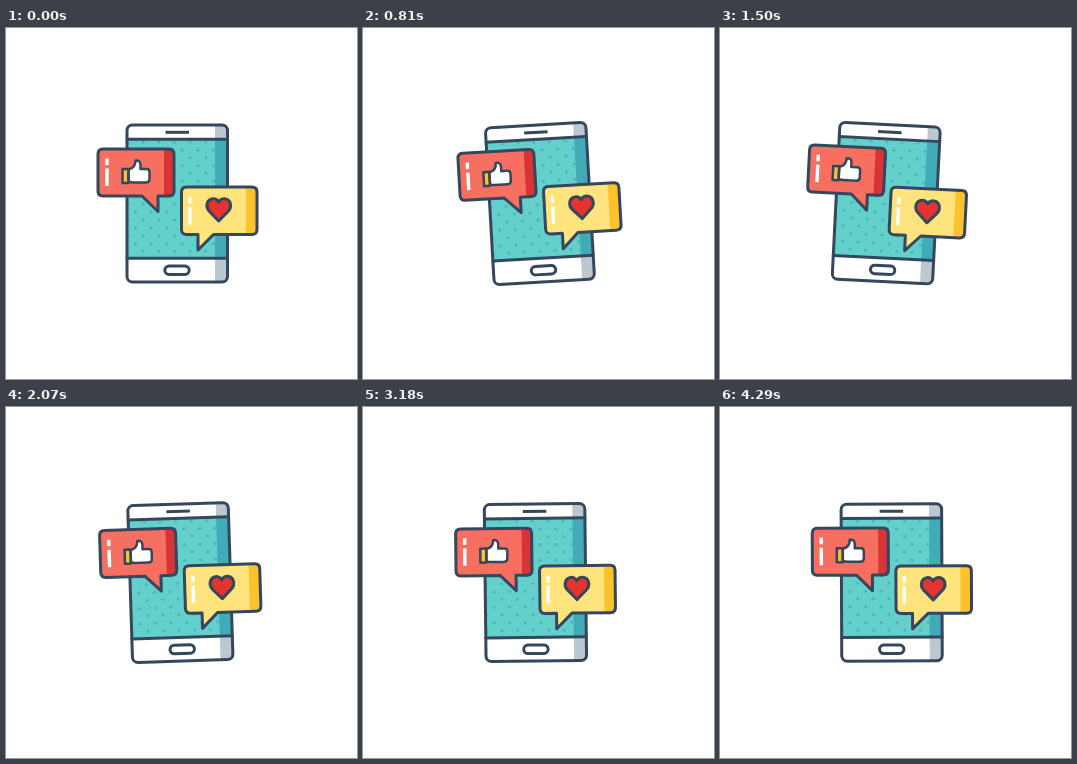
Recreate the animation shown at these times as an HTML page. Size 351 by 351 pixels, loop 4.32 s.

```html
<!DOCTYPE html>
<html lang="en">
<head>
<meta charset="utf-8">
<title>Swinging phone</title>
<style>
  html, body { margin: 0; width: 100%; height: 100%; overflow: hidden; background: #fff; }
  svg { display: block; width: 100vw; height: 100vh; }
  .line { fill: none; stroke: #34475c; stroke-width: 3; stroke-linejoin: round; stroke-linecap: round; }
  .shine { fill: none; stroke: #fff; stroke-width: 3.4; }
</style>
</head>
<body>
<svg viewBox="0 0 351 351">
  <defs>
    <pattern id="dots" x="129.5" y="114" width="15.6" height="15.6" patternUnits="userSpaceOnUse">
      <circle cx="0" cy="8" r="1.5" fill="#47b3b7"/>
      <circle cx="15.6" cy="8" r="1.5" fill="#47b3b7"/>
      <circle cx="7.8" cy="0" r="1.5" fill="#47b3b7"/>
      <circle cx="7.8" cy="15.6" r="1.5" fill="#47b3b7"/>
    </pattern>
    <rect id="body" x="121" y="97" width="100.5" height="157" rx="5.5"/>
    <path id="likeBubble" d="M97 121H163Q168 121 168 126V163Q168 168 163 168H152V183.5L136 168H97Q92 168 92 163V126Q92 121 97 121Z"/>
    <path id="loveBubble" d="M180.500 159H246Q251 159 251 164V201.500Q251 206.500 246 206.500H207.500L192 222V206.500H180.500Q175.500 206.500 175.500 201.500V164Q175.500 159 180.500 159Z"/>
    <clipPath id="bodyClip"><use href="#body"/></clipPath>
    <clipPath id="likeClip"><use href="#likeBubble"/></clipPath>
    <clipPath id="loveClip"><use href="#loveBubble"/></clipPath>
  </defs>

  <g id="phone">
    <g clip-path="url(#bodyClip)">
      <rect x="120" y="96" width="103" height="160" fill="#fff"/>
      <rect x="209" y="96" width="14" height="160" fill="#bcc8d0"/>
      <rect x="120" y="111" width="103" height="119.500" fill="#64d0cc"/>
      <rect x="122" y="113" width="87" height="116" fill="url(#dots)"/>
      <rect x="209" y="111" width="14" height="119.500" fill="#43abb8"/>
    </g>
    <use href="#body" class="line"/>
    <path class="line" d="M121 111.300H221.500M121 230.300H221.500"/>
    <path class="line" style="stroke-linecap:butt" d="M159.500 104.300H183"/>
    <rect class="line" style="fill:#fff" x="158.800" y="238" width="24.400" height="8.500" rx="4.250"/>

    <g clip-path="url(#likeClip)">
      <rect x="90" y="119" width="80" height="67" fill="#f76f60"/>
      <rect x="158" y="119" width="12" height="50" fill="#d63436"/>
    </g>
    <use href="#likeBubble" class="line"/>
    <path class="shine" d="M101 130.500V137M101 140.500V158"/>
    <rect x="116.500" y="141" width="6" height="14" fill="#fcc22d"/>
    <path class="line" style="fill:#fff;stroke-width:2.500" d="M122.500 141.500Q129.500 140 129.500 132.500Q134.500 132 134.500 137V141H140.500Q143.500 141 143.500 144V151Q143.500 154.500 140 154.500H127Q125 154.500 122.500 153.500Z"/>
    <path class="line" style="stroke-width:2.500" d="M122.500 141H116.500V155H122.500Z"/>

    <g clip-path="url(#loveClip)">
      <rect x="174" y="157" width="79" height="67" fill="#ffe37c"/>
      <rect x="240" y="157" width="13" height="51" fill="#fcc22d"/>
    </g>
    <use href="#loveBubble" class="line"/>
    <path class="shine" d="M183.800 169V175.500M183.800 179V196.500"/>
    <path class="line" style="fill:#e5332f" d="M212.700 193L203 183C199.500 179 200.500 172.500 205.500 171C208.500 170 211.500 171.500 212.700 174C214 171.500 217 170 220 171C225 172.500 226 179 222.500 183Z"/>
  </g>
</svg>
<script>
  const LOOP = 4320, SWING = 540;
  const FIRST_ANGLE = 8, DECAY = 0.61;
  const PIVOT = '174.5 76';
  const phone = document.getElementById('phone');

  // Each swing ends on the opposite side, with less reach than the one before.
  const reach = n => n === 0 ? 0 : FIRST_ANGLE * (-DECAY) ** (n - 1);
  const easeOut = p => 1 - (1 - p) ** 3;

  function draw(now) {
    const t = now % LOOP;
    const n = Math.floor(t / SWING);
    const from = reach(n), to = reach(n + 1);
    const angle = from + (to - from) * easeOut(t / SWING - n);
    phone.setAttribute('transform', `rotate(${angle} ${PIVOT})`);
  }

  let start;
  function tick(now) {
    start ??= now;
    draw(now - start);
    requestAnimationFrame(tick);
  }
  draw(0);
  requestAnimationFrame(tick);
</script>
</body>
</html>
```
